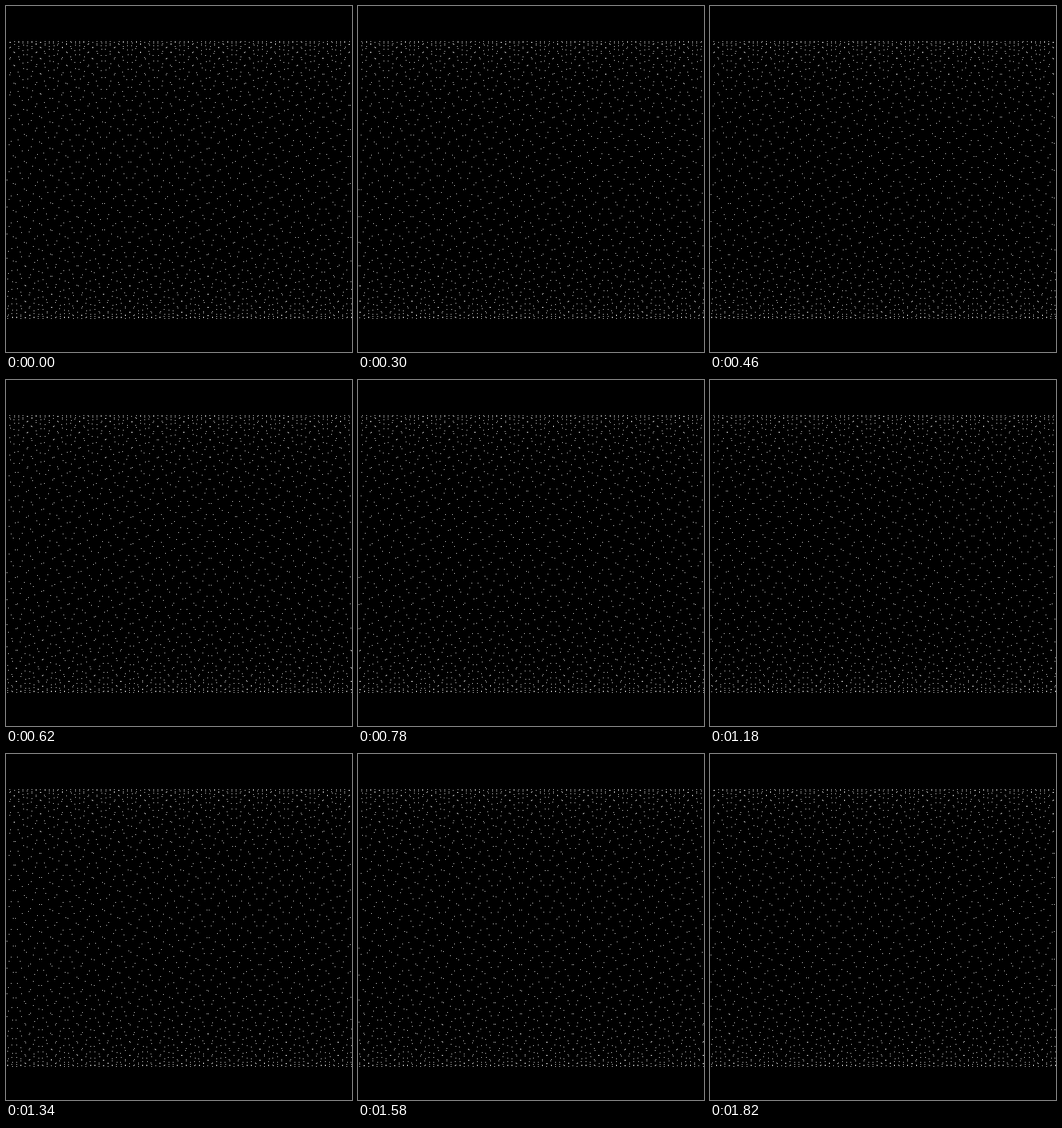
Write an HTML page with a canvas that moves like this. It is 500 px wide and 500 px high and loops after 1840 ms.

```html
<!DOCTYPE html>
<html lang="en">
<head>
<meta charset="utf-8">
<title>Sampled sine</title>
<style>
  html, body { margin: 0; width: 100%; height: 100%; overflow: hidden; background: #000; }
  canvas { display: block; }
</style>
</head>
<body>
<canvas id="stage" width="500" height="500"></canvas>
<script>
const SIZE = 500;
const AMPLITUDE = 200;
const SPACING = 0.2;
const STEPS = 23;
const STEP_MS = 80;
const LEAD_MS = 20;
const SPACINGS_PER_LOOP = 2;

const ctx = document.getElementById('stage').getContext('2d');
const toPixel = v => Math.floor(v + 1.25);

// Evenly spaced samples slide along a fixed sine whose wavelength is only 2π pixels.
function draw(step) {
  ctx.fillStyle = '#000';
  ctx.fillRect(0, 0, SIZE, SIZE);
  ctx.fillStyle = '#fff';
  const offset = (SPACINGS_PER_LOOP * step / STEPS) % 1;
  for (let i = 0; i < SIZE / SPACING; i++) {
    const x = (i + offset) * SPACING;
    const y = SIZE / 2 + AMPLITUDE * Math.sin(x);
    ctx.fillRect(toPixel(x), toPixel(y), 1, 1);
  }
}

let shown = -1;
function tick() {
  const step = Math.floor((performance.now() + LEAD_MS) / STEP_MS) % STEPS;
  if (step !== shown) draw(shown = step);
  requestAnimationFrame(tick);
}
tick();
</script>
</body>
</html>
```
